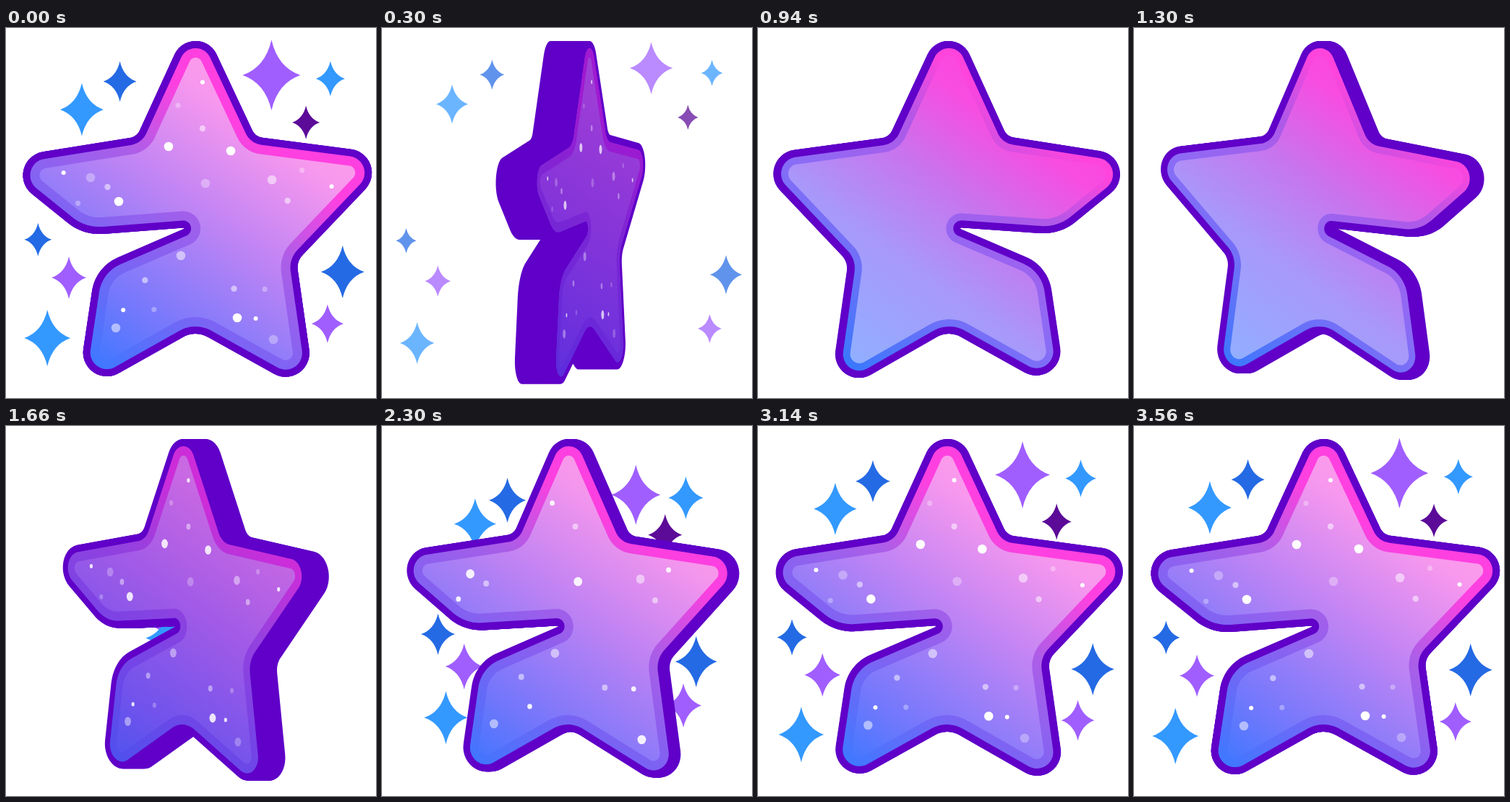
An HTML page with a canvas that plays this animation: 512x512 px, repeating every 3.58 s.

```html
<!DOCTYPE html>
<html lang="en">
<head>
<meta charset="utf-8">
<title>Spinning star</title>
<style>
html, body { margin: 0; width: 100%; height: 100%; overflow: hidden; background: #fff; }
canvas { display: block; width: 512px; height: 512px; }
</style>
</head>
<body>
<canvas id="stage" width="512" height="512"></canvas>
<script>
const ctx = document.getElementById('stage').getContext('2d');
const LOOP = 3580, BURST = 1580, SETTLE = 1970;
const CX = 263, CY = 262, BORDER = 10, DEPTH = 60, TIP = 33;
const PURPLE = '#6000c8';

// Large dots, the first four bright
const BIG_DOTS = [
  [225, 164], [311, 170], [156, 240], [320, 401], [117, 207],
  [276, 215], [370, 431], [368, 210], [242, 315], [152, 415]
];

// Sparkles: offset from the centre and half width
const SPARKLES = [
  [-158, -150, 30], [-105, -189, 23], [106, -198, 40], [188, -193, 20], [-219, 31, 19],
  [-176, 84, 24], [-206, 168, 32], [205, 76, 30], [184, 148, 22], [154, -132, 19]
];
const TINTS = ['#3399ff', '#246ae4', '#a05eff'], PLUM = '#5c0a98';

// Turn of the star up to its first overshoot: time, degrees
const SPIN = [[0, 0], [580, 231], [1300, 874], [1660, 1034], [SETTLE, 1107]];

const clamp = v => Math.max(0, Math.min(1, v));
const mix = (a, b, p) => a + (b - a) * p;
const bump = (t, at, width) => Math.cos(clamp(Math.abs(t - at) / width) * Math.PI / 2) ** 2;

// Smooth curve through the keys, at rest at both ends
function curve(keys, t) {
  const last = keys.length - 1;
  const i = keys.findIndex(k => k[0] > t) - 1;
  const slope = j => j === 0 || j === last ? 0
    : (keys[j + 1][1] - keys[j - 1][1]) / (keys[j + 1][0] - keys[j - 1][0]);
  const [t0, a] = keys[i], [t1, b] = keys[i + 1];
  const d = t1 - t0, p = (t - t0) / d, q = 1 - p;
  return a * (1 + 2 * p) * q * q + slope(i) * d * p * q * q
    + b * p * p * (3 - 2 * p) - slope(i + 1) * d * p * p * q;
}

// Fast turns, then a fading swing about the front view
function spin(t) {
  if (t < SETTLE) return curve(SPIN, t);
  const fade = 1 - (t - SETTLE) / (LOOP - SETTLE);
  return 1080 + 27 * fade * Math.cos((t - SETTLE) / 740 * 2 * Math.PI);
}

function gradient(...stops) {
  const g = ctx.createLinearGradient(130, 470, 400, 90);
  stops.forEach(([at, color]) => g.addColorStop(at, color));
  return g;
}
const FRONT = {
  inset: 23,
  band: gradient([0, '#3f78ff'], [0.3, '#7c64f4'], [0.58, '#ac5ee8'], [0.82, '#ff40e0']),
  panel: gradient([0, '#3f78ff'], [0.2, '#7478fc'], [0.55, '#c084f4'], [0.85, '#f898ee'], [1, '#ff9ee8'])
};
const BACK = {
  inset: 20,
  band: gradient([0, '#3a78fc'], [0.4, '#8a6cf6'], [0.7, '#b058e8'], [0.9, '#ff44dc']),
  panel: gradient([0, '#90b0ff'], [0.35, '#a898fa'], [0.6, '#c874ee'], [0.85, '#f84ce0'], [1, '#ff44dc'])
};

// Corners [x, y, radius]: a mirrored star whose left waist is cut by a mouth
function starCorners(bite) {
  const valley = s => [CX + 82 * s, 150.5, 18];
  const arm = s => [CX + 282 * s - 3, 179.5 - 3.5 * s, TIP];
  const leg = s => [CX + 166 * s, 511, TIP];
  const mouth = [
    [107 + 20 * bite, 287 + 16 * bite, 70],
    [251, 276, 1],
    [124 + 16 * bite, 331 - 23 * bite, 60]
  ];
  return [[262, -26, TIP - 1], valley(-1), arm(-1), ...mouth, leg(-1),
    [262, 418, 35], leg(1), [402, 323, 25], arm(1), valley(1)];
}

// Rounded outline, moved inwards by inset
function outline(corners, inset) {
  const points = [], n = corners.length;
  corners.forEach(([x, y, r], i) => {
    const prev = corners[(i + n - 1) % n], next = corners[(i + 1) % n];
    const from = Math.atan2(y - prev[1], x - prev[0]);
    let turn = Math.atan2(next[1] - y, next[0] - x) - from;
    turn = Math.atan2(Math.sin(turn), Math.cos(turn));
    const bend = turn < 0 ? r : -r, cut = r * Math.tan(Math.abs(turn) / 2);
    const ox = x - Math.cos(from) * cut + Math.sin(from) * bend;
    const oy = y - Math.sin(from) * cut - Math.cos(from) * bend;
    for (let k = 0; k <= 14; k++) {
      const a = from + turn * k / 14;
      points.push([ox + Math.sin(a) * (inset - bend), oy - Math.cos(a) * (inset - bend)]);
    }
  });
  return points;
}

function fillShape(points, project, shift, paint) {
  ctx.beginPath();
  points.forEach(p => ctx.lineTo(...project(p, shift)));
  ctx.closePath();
  ctx.fillStyle = paint;
  ctx.fill();
}

function drawDots(t, cos, solid, place) {
  const wink = bump(t, 2300, 420), glow = bump(t, 2760, 400);
  const bright = 1 - wink, faint = mix(0.32, 0.9, wink) + 0.2 * glow, soft = 0.52 + 0.4 * glow;
  ctx.fillStyle = '#fff';
  const dot = (x, y, r, alpha) => {
    ctx.globalAlpha = alpha * solid;
    ctx.beginPath();
    ctx.ellipse(...place([x, y]), r * cos, r, 0, 0, 7);
    ctx.fill();
  };
  BIG_DOTS.forEach(([x, y], i) => dot(x, y, 6.3, i < 4 ? bright : i < 7 ? faint : soft));

  // Small dots zigzag down each of the five points
  for (let i = 0; i < 15; i++) {
    const ray = Math.floor(i / 3), step = i % 3;
    const a = ray * Math.PI * 0.4 - Math.PI / 2;
    const along = (195 - 32 * step) * (ray === 2 || ray === 3 ? 0.8 : 1);
    const side = step === 1 ? -24 : 10;
    dot(262 + Math.cos(a) * along - Math.sin(a) * side,
      270 + Math.sin(a) * along + Math.cos(a) * side,
      3 + step * 0.6, [bright, faint, soft][step]);
  }
  ctx.globalAlpha = 1;
}

// Sparkles shoot out, drift, then shrink and fade in the next round
function drawSparkles(t) {
  const u = t < BURST ? t + LOOP : t;
  const out = Math.max(0, (u - LOOP) / 580);
  const alpha = clamp(1 - 0.88 * Math.max(0, out - 0.3) / 0.7);
  if (!alpha) return;
  ctx.globalAlpha = alpha;
  const reach = 1 - Math.exp((BURST - u) / 390);
  const scale = clamp((u - BURST) / 60) * clamp(1 - 0.5 * out);
  SPARKLES.forEach(([dx, dy, size], i) => {
    const far = reach + 38 / Math.hypot(dx, dy) * out * out;
    const w = mix(size / 2 + 14, size, clamp((u - 2300) / 1280)) * scale, h = w * 1.22;
    const x = 262 + dx * far, y = 262 + dy * far;
    ctx.beginPath();
    ctx.moveTo(x, y - h);
    for (const [sx, sy, ex, ey] of [[1, -1, 1, 0], [1, 1, 0, 1], [-1, 1, -1, 0], [-1, -1, 0, -1]]) {
      ctx.quadraticCurveTo(x + w * sx * 0.22, y + h * sy * 0.22, x + w * ex, y + h * ey);
    }
    ctx.fillStyle = i === 9 ? PLUM : TINTS[i % 3];
    ctx.fill();
  });
  ctx.globalAlpha = 1;
}

function drawStar(t) {
  const angle = spin(t) * Math.PI / 180;
  const sin = Math.sin(angle), cos = Math.cos(angle);
  const nod = bump(t, 2760, 380);
  const corners = starCorners(nod);

  // Seen slightly from above, with a little perspective
  const project = ([x, y], shift) => {
    const z = -(x - CX) * sin;
    return [CX + (x - CX) * cos + shift - 3 * sin * sin, y + z * (0.056 + (y - CY) * 0.00015)];
  };
  const isFront = cos > 0;
  const half = DEPTH / 2 * sin * Math.abs(sin);
  const near = isFront ? half : -half;
  const skin = isFront ? FRONT : BACK;

  ctx.save();
  ctx.translate(CX, CY);
  ctx.rotate(-4.5 * nod * Math.PI / 180);
  ctx.translate(-CX, -CY);

  // Thick body swept from the far face to the near one
  const edge = outline(corners, 0);
  const steps = Math.ceil(Math.abs(near) * 2) + 1;
  for (let i = 0; i <= steps; i++) {
    fillShape(edge, project, mix(-near, near, i / steps), PURPLE);
  }

  const face = outline(corners, BORDER);
  fillShape(face, project, near, skin.band);
  fillShape(outline(corners, skin.inset), project, near, skin.panel);

  if (isFront) {
    const shade = Math.min(0.6, 1.2 * sin ** 4);
    ctx.globalAlpha = shade;
    fillShape(face, project, near, PURPLE);
    drawDots(t, cos, 1 - shade / 2, p => project(p, near));
  }
  ctx.restore();
}

const start = performance.now();
function tick() {
  const t = (performance.now() - start) % LOOP;
  ctx.fillStyle = '#fff';
  ctx.fillRect(0, 0, 512, 512);
  drawSparkles(t);
  drawStar(t);
  requestAnimationFrame(tick);
}
tick();
</script>
</body>
</html>
```
